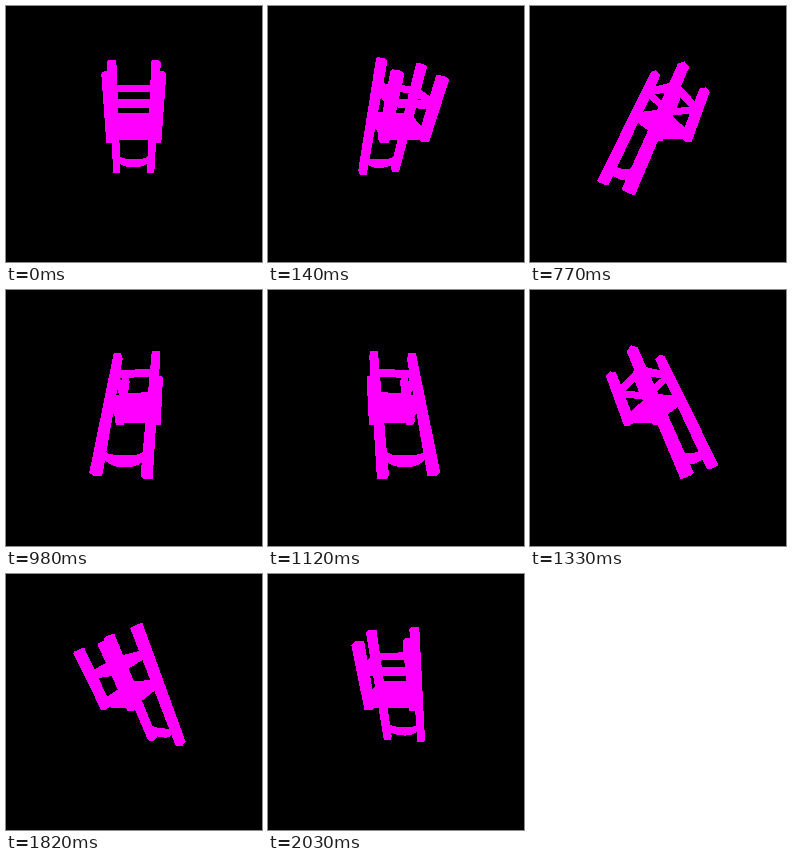
These frames come from a looping animation (256x256 px, 2.1 s). An HTML page:

```html
<!DOCTYPE html>
<html lang="en">
<head>
<meta charset="utf-8">
<title>Turning chair</title>
<style>
  html, body { margin: 0; width: 100%; height: 100%; overflow: hidden; background: #000; }
  svg { display: block; width: 100vw; height: 100vh; }
</style>
</head>
<body>
<svg viewBox="0 0 256 256" shape-rendering="crispEdges">
  <path id="chair" fill="#f0f"/>
</svg>
<script>
const STEP = 70, STEPS = 30;
const CAMERA = 222, CENTER_X = 127.8, CENTER_Y = 127.4;
const TILT = Math.PI / 6;
const chair = document.getElementById('chair');

// Chair space: u runs along the legs, v from back to front, w from side to side.
const slab = (u, v, w, halfV, halfW) => [
  [u, v - halfV, w - halfW], [u, v + halfV, w - halfW],
  [u, v - halfV, w + halfW], [u, v + halfV, w + halfW]
];

const box = (u0, u1, v, w, halfV, halfW) =>
  [...slab(u0, v, w, halfV, halfW), ...slab(u1, v, w, halfV, halfW)];

function post(u0, u1, v, w, half, bevelBottom) {
  const end = half - 1.2, bottom = bevelBottom ? end : half;
  return [
    ...slab(u0, v, w, bottom, bottom), ...slab(u0 + 0.8, v, w, half, half),
    ...slab(u1 - 0.8, v, w, half, half), ...slab(u1, v, w, end, end)
  ];
}

// The crest has a nearly flat inner edge and a rounded outer one.
function crest() {
  const segments = 14, span = 18;
  const inner = w => -48.2 + 4.5 * Math.pow(Math.abs(w) / 17, 5);
  const outer = w => -56.4 + 6 * Math.pow(Math.abs(w) / 17, 2.5);
  const slice = w => [inner, outer].flatMap(edge => slab(edge(w), -19.7, w, 3, 0));
  const at = i => span * (2 * i / segments - 1);
  return Array.from({ length: segments }, (_, i) => [...slice(at(i)), ...slice(at(i + 1))]);
}

const sides = [-20.6, 20.6];
const parts = [
  ...sides.map(w => post(-65, 66.2, -20, w, 4.1, true)),
  ...sides.map(w => post(4.2, 66, 19.6, w, 4.1, false)),
  ...sides.map(w => box(37.3, 42.9, 0, w, 19, 2.8)),
  ...[-19.5, 19.5].map(v => box(37.3, 42.9, v, 0, 2.8, 20)),
  box(5.6, 12.5, 0, 0, 21.5, 22.5),
  ...crest()
];

function project([u, v, w], angle) {
  const out = u * Math.sin(TILT) + v * Math.cos(TILT);
  const up = u * Math.cos(TILT) - v * Math.sin(TILT);
  const x = out * Math.sin(angle) + w * Math.cos(angle);
  const z = out * Math.cos(angle) - w * Math.sin(angle);
  const scale = CAMERA / (CAMERA - z);
  return [CENTER_X + x * scale, CENTER_Y - up * scale];
}

function hull(points) {
  const sorted = [...points].sort((a, b) => a[0] - b[0] || a[1] - b[1]);
  const cross = (o, a, b) => (a[0] - o[0]) * (b[1] - o[1]) - (a[1] - o[1]) * (b[0] - o[0]);
  const chain = list => {
    const line = [];
    for (const p of list) {
      while (line.length > 1 && cross(line.at(-2), line.at(-1), p) <= 0) line.pop();
      line.push(p);
    }
    return line.slice(0, -1);
  };
  return [...chain(sorted), ...chain(sorted.reverse())];
}

function draw(time) {
  const angle = Math.floor(time / STEP) % STEPS * 2 * Math.PI / STEPS;
  chair.setAttribute('d', parts.map(part => {
    const outline = hull(part.map(point => project(point, angle)));
    return 'M' + outline.map(p => p.map(n => n.toFixed(2)).join()).join('L') + 'Z';
  }).join(''));
}

const start = performance.now();
function tick() {
  draw(performance.now() - start);
  requestAnimationFrame(tick);
}
tick();
</script>
</body>
</html>
```
